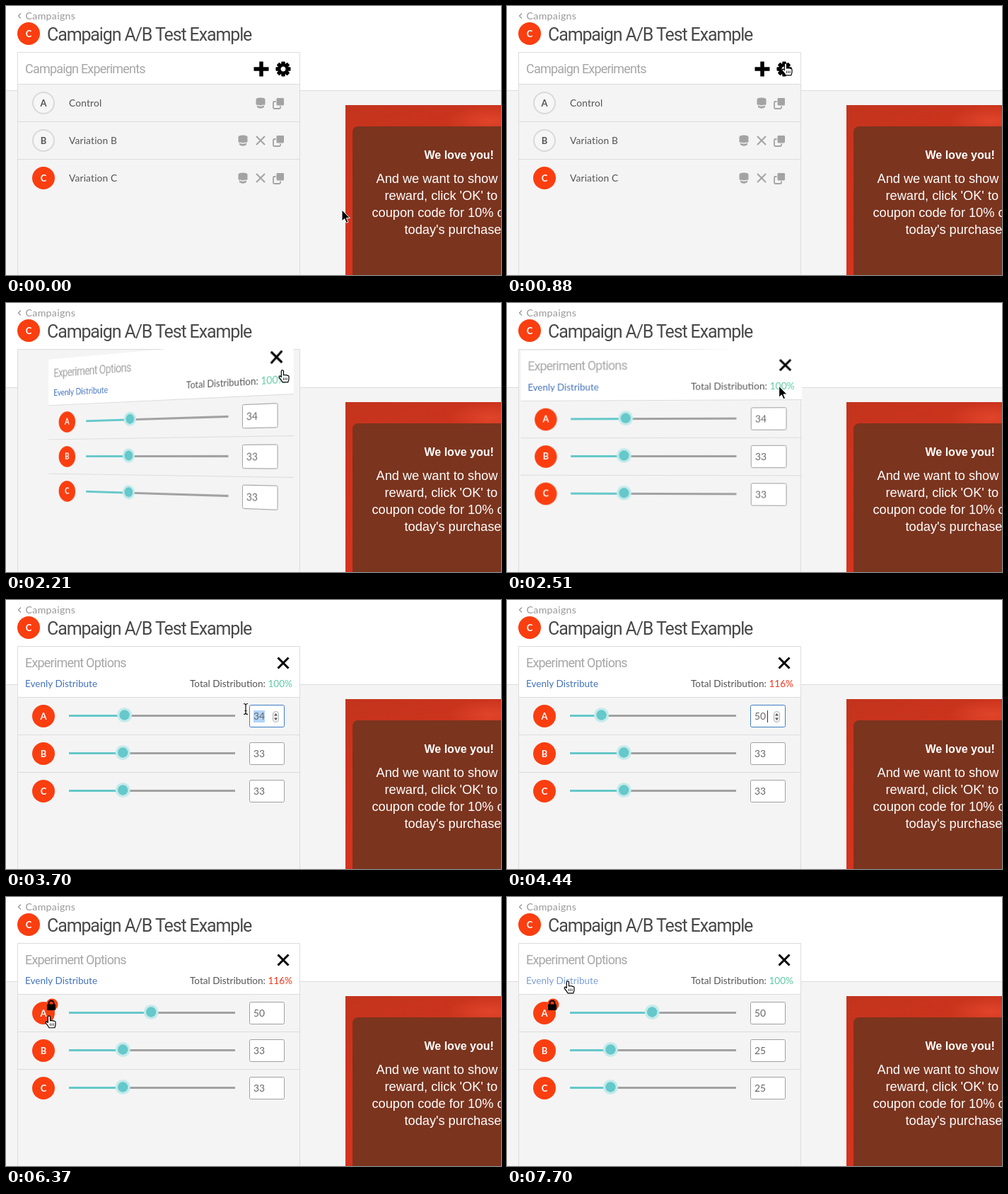
Animation of 700 by 380 pixels, one loop 8000 ms. Source, as an HTML page:

```html
<!DOCTYPE html>
<html lang="en">
<head>
<meta charset="utf-8">
<title>Campaign experiments</title>
<style>
  html, body { margin: 0; width: 100%; height: 100%; overflow: hidden; background: #f4f4f4; }
  #stage { position: absolute; inset: 0; overflow: clip; contain: strict; }
  svg { position: absolute; left: 0; top: 0; width: 700px; height: 380px; overflow: hidden; }
  .face { transform-origin: 216px 217px; overflow: visible; }
  text { font: 13.8px Lato, sans-serif; fill: #555; white-space: pre; }
  .title { font: 25px Roboto, sans-serif; letter-spacing: -1.12px; fill: #484848; }
  .subtitle { font: 18px Roboto, sans-serif; letter-spacing: -.8px; fill: #a6a6a6; }
  .badge { font-weight: 700; font-size: 13px; text-anchor: middle; }
  .promo text { font: 18.2px "Liberation Sans", Arial, sans-serif; fill: #fff; }
  .line { stroke: #dcdcdc; fill: none; }
</style>
</head>
<body>
<div id="stage">
<svg id="page">
  <defs>
    <linearGradient id="red" x2=".25" y2="1">
      <stop stop-color="#c3341d"/><stop offset=".5" stop-color="#d2331d"/><stop offset="1" stop-color="#d6341f"/>
    </linearGradient>
    <radialGradient id="glow"><stop stop-color="#e0452a"/><stop offset="1" stop-color="#e0452a" stop-opacity="0"/></radialGradient>
  </defs>
  <path fill="#fff" d="M0 0H700V119H0z"/>
  <path class="line" d="M0 119.5H700"/>
  <path fill="none" stroke="#999" stroke-width="1.3" d="M21 10.5L17.5 14 21 17.5"/>
  <text x="27.5" y="19" style="font-size:14.2px;fill:#999;letter-spacing:.3px">Campaigns</text>
  <circle cx="32" cy="39" r="16" fill="#fa3e10"/>
  <text class="badge" x="32" y="43.5" style="fill:#fff">C</text>
  <text class="title" x="58" y="48.5">Campaign A/B Test Example</text>
  <path class="line" style="fill:#f4f4f4" d="M16.5 390V65.5H415.5V390z"/>
  <g class="promo">
    <path fill="url(#red)" d="M480 140H700V380H480z"/>
    <ellipse cx="685" cy="162" rx="60" ry="22" fill="url(#glow)"/>
    <rect x="490" y="170" width="230" height="230" rx="8" fill="#7b341e"/>
    <text x="591.5" y="216" style="font-size:16px;font-weight:700">We love you!</text>
    <text x="523.5" y="250">And we want to show you</text>
    <text x="535.5" y="274">reward, click 'OK' to</text>
    <text x="517.5" y="298">coupon code for 10% off</text>
    <text x="563.5" y="322">today's purchase</text>
  </g>
</svg>
<svg id="front" class="face"></svg>
<svg id="back" class="face"></svg>
<svg id="pointer"></svg>
</div>

<script>
const $ = id => document.getElementById(id);
const LOOP = 8000, STEP = LOOP / 54;
const RED = '#fa3e10', TEAL = '#65c8ca', GREY = '#a3a3a3';

const badge = (y, letter, solid) => `
  <circle cx="53" cy="${y}" r="${solid ? 16 : 15}" fill="${solid ? RED : '#f6f6f6'}" ${solid ? '' : 'stroke="#d9d9d9" stroke-width="2"'}/>
  <text class="badge" x="53" y="${y + 4.5}" ${solid ? 'style="fill:#fff"' : ''}>${letter}</text>`;
const header = (bottom, title) => `
  <path fill="#fff" d="M17 66H415V${bottom}H17z"/>
  <path class="line" d="M17 ${bottom + .5}h398m0 53h-398m0 53h398"/>
  <text class="subtitle" x="27" y="94.5">${title}</text>`;
const cross = (x, y, r, color, width) =>
  `<path stroke="${color}" stroke-width="${width}" d="M${x - r} ${y - r}l${2 * r} ${2 * r}m0-${2 * r}l-${2 * r} ${2 * r}"/>`;

// Front face: list of experiments
const bucket = (x, y) => `<g transform="translate(${x} ${y})">
  <path fill="${GREY}" d="M-6.5-5Q-6.5-7.5 0-7.5T6.5-5V2L5 3V6Q0 9.5-5 6V3L-6.5 2z"/>
  <path fill="none" stroke="#f0f0f0" stroke-width="1.6" d="M-4.5 3Q0 5 4.5 3"/></g>`;
const copy = y => `
  <rect x="378" y="${y - 2}" width="10" height="10" rx="1.5" fill="none" stroke="${GREY}" stroke-width="1.8"/>
  <rect x="382" y="${y - 7.5}" width="11.5" height="11.5" rx="2" fill="${GREY}" stroke="#f4f4f4"/>`;
const tooth = i => `<rect x="-2.7" y="-10.5" width="5.4" height="6" rx="1" transform="rotate(${i * 45})"/>`;
const gear = `<g transform="translate(392 89)">${[0, 1, 2, 3, 4, 5, 6, 7].map(tooth).join('')}
  <circle r="5.7" fill="none" stroke="#000" stroke-width="4.4"/></g>`;

$('front').innerHTML = header(110, 'Campaign Experiments') +
  '<path stroke="#000" stroke-width="5.5" d="M350.5 89h21m-10.5-10.5v21"/>' + gear +
  ['Control', 'Variation B', 'Variation C'].map((name, i) => {
    const y = 137 + 53 * i;
    return badge(y, 'ABC'[i], i == 2) + `<text x="89" y="${y + 5}" letter-spacing=".15">${name}</text>` + copy(y) +
      (i ? bucket(335, y) + cross(360, y, 6, GREY, 2) : bucket(360, y));
  }).join('');

// Back face: distribution options
const slider = i => {
  const y = 164 + 53 * i;
  return badge(y, 'ABC'[i], true) + `
  <path stroke="#a2a2a2" stroke-width="3" d="M89 ${y - .5}H324"/>
  <path id="fill${i}" stroke="${TEAL}" stroke-width="3"/>
  <g id="knob${i}"><circle r="10.5" fill="#c5eaeb"/><circle r="7.2" fill="${TEAL}"/></g>
  <rect id="box${i}" x="344.5" y="${y - 15.5}" width="49" height="31" rx="2" fill="#fff" stroke="#a0a0a0"/>
  ${i ? '' : '<rect id="select" y="156" height="17" fill="#b2d4fb"/>'}
  <text id="value${i}" x="350" y="${y + 5}" style="fill:#666"></text>`;
};
$('back').innerHTML = header(137, 'Experiment Options') + cross(392, 89, 7.5, '#000', 3) + `
  <text id="evenly" x="27" y="123" style="font-size:13.6px">Evenly Distribute</text>
  <text x="405" y="123" text-anchor="end" style="font-size:13.6px">Total Distribution: <tspan id="total"></tspan></text>` +
  [0, 1, 2].map(slider).join('') + `
  <path id="caret" stroke="#333" d="M368.5 156v17"/>
  <g id="spinner"><rect x="377.5" y="157.5" width="8" height="15" rx="3.5" fill="#f3f3f3" stroke="#b5b5b5"/>
    <path fill="#555" d="M379 163.5l2.5-3.5 2.5 3.5zm0 3l2.5 3.5 2.5-3.5z"/></g>
  <g id="lock"><circle cx="65" cy="152" r="8.5" fill="${RED}"/>
    <rect x="58" y="151.5" width="12" height="8.5" rx="1"/>
    <path fill="none" stroke="#000" stroke-width="2" d="M60.5 152v-2a3.5 3.5 0 0 1 7 0v2"/></g>`;

// Pointers, hot spot at the origin
const beam = (color, width) => `<path fill="none" stroke="${color}" stroke-width="${width}"
  d="M-3-7.5q3 0 3 2 0-2 3-2M0-5.5v11M-3 7.5q3 0 3-2 0 2 3 2M-1.5 2.5h3"/>`;
$('pointer').innerHTML = `<g id="tip">
  <path id="arrow" stroke="#fff" d="M0 0V16l3.7-3.5 2.6 5.8 2.6-1.1-2.6-5.6h5z"/>
  <g id="hand" stroke="#000" stroke-linejoin="round"><path fill="#fff" stroke-width="1.2"
    d="M-1.7 9.5V1.5a1.6 1.6 0 0 1 3.2 0V7q1.2-1 2.7 0 1.3-.8 2.5.4 2.3-.3 2.3 1.6V12q0 2-1.2 4.8H0Q-1.5 14-4.5 10.5-5.5 8-3.5 8z"/>
    <path stroke-width=".8" d="M1.5 10.5v3.5m2.3-3.5v3.5m2.3-3.5v3.5"/></g>
  <g id="beam">${beam('#fff', 2.6) + beam('#000', 1.2)}</g></g>`;

const pointerPath = [[150, 475, 288], [889, 394, 81], [1185, 394, 81], [1480, 391, 89], [1778, 391, 89],
  [2222, 391, 95], [2370, 391, 97], [2815, 372, 158], [2963, 372, 158], [3704, 339, 154], [4890, 339, 154],
  [5333, 162, 155], [6074, 60, 167], [6222, 60, 167], [6370, 61, 168], [6820, 78, 130], [6963, 78, 130], [7259, 86, 119]];
const pointerShape = [[0, 'arrow'], [700, 'hand'], [2450, 'arrow'], [2700, 'beam'], [4250, ''], [5000, 'beam'],
  [5100, 'arrow'], [5900, 'hand'], [6600, 'arrow'], [7150, 'hand']];
const knobA = [[4230, 34], [4290, 8.7], [4400, 8.7], [4570, 50]];
const knobBC = [[7330, 33], [7680, 25]];

function along(keys, t) {
  const next = keys.findIndex(k => k[0] > t);
  if (next <= 0) return keys.at(next).slice(1);
  const a = keys[next - 1], b = keys[next], p = (t - a[0]) / (b[0] - a[0]);
  return a.slice(1).map((v, i) => v + (b[i + 1] - v) * p);
}

// cubic-bezier(.25, .1, .25, 1)
function ease(x) {
  if (x <= 0 || x >= 1) return x <= 0 ? 0 : 1;
  let lo = 0, hi = 1;
  for (let i = 0; i < 20; i++) {
    const s = (lo + hi) / 2;
    if (.75 * s * (1 - s) + s ** 3 < x) lo = s; else hi = s;
  }
  return .3 * lo * (1 - lo) ** 2 + 3 * lo * lo * (1 - lo) + lo ** 3;
}

const show = (id, on) => $(id).style.display = on ? '' : 'none';
const turn = (id, angle) => $(id).style.transform = angle ? `perspective(1000px) rotateY(${angle}deg)` : 'none';

function draw(t) {
  const angle = 180 * ease((t - 1687) / 1010);
  turn('front', angle);
  turn('back', angle - 180);
  show('front', angle < 90);
  show('back', angle >= 90);

  const [x, y] = along(pointerPath, t);
  const shape = pointerShape.findLast(k => k[0] <= t)[1];
  for (const id of ['arrow', 'hand', 'beam']) show(id, id == shape);
  $('tip').setAttribute('transform', `translate(${x} ${y})`);

  const rest = t < 7330 ? 33 : 25;
  const values = [t < 4250 ? 34 : t < 4400 ? 5 : 50, rest, rest];
  const knobs = [along(knobA, t)[0], ...along(knobBC, t), ...along(knobBC, t)];
  knobs.forEach((v, i) => {
    const kx = 87.7 + 2.35 * v, ky = 162.5 + 53 * i;
    $('knob' + i).setAttribute('transform', `translate(${kx} ${ky})`);
    $('fill' + i).setAttribute('d', `M89 ${ky + 1}H${kx}`);
    $('value' + i).textContent = values[i];
  });

  const sum = values[0] + 2 * rest;
  $('total').textContent = sum + '%';
  $('total').style.fill = sum == 100 ? '#5cc9a2' : '#f4321a';
  $('evenly').style.fill = t > 7200 ? '#7c9fd6' : '#4273bd';

  const focus = t > 3100 && t < 6050;
  $('box0').setAttribute('stroke', focus ? '#3f7cc4' : '#a0a0a0');
  show('spinner', t > 2750 && t < 6050);
  show('caret', focus && t > 4250);
  $('caret').setAttribute('transform', `translate(${values[0] == 5 ? -8 : 0} 0)`);
  const left = Math.max(350, Math.min(366, x));
  show('select', focus && t < 4250);
  $('select').setAttribute('x', left);
  $('select').setAttribute('width', 366 - left);
  show('lock', t > 6200);
}

// Time advances in even steps, like a screen capture
function tick() {
  const step = Math.floor((performance.now() % LOOP + 15) / STEP);
  draw(Math.min(step, 53) * STEP);
  requestAnimationFrame(tick);
}
tick();
</script>
</body>
</html>
```
